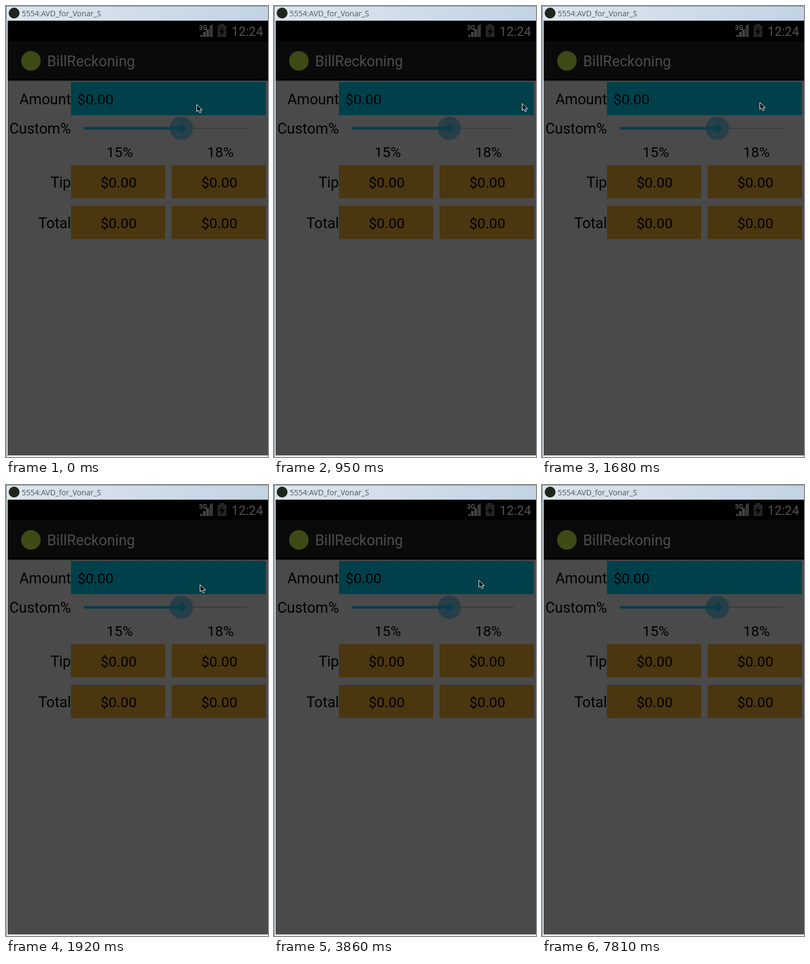
Animation of 484 by 830 pixels, one loop 8000 ms. Source, as an HTML page:

```html
<!DOCTYPE html>
<html lang="en">
<head>
<meta charset="utf-8">
<title>BillReckoning</title>
<style>
  html, body { margin: 0; width: 100%; height: 100%; overflow: hidden; background: #4a4a4a; }
  svg { display: block; }
  text { font-family: Roboto, sans-serif; font-size: 27px; }
  .value { font-size: 26.5px; }
  .mid { text-anchor: middle; }
  .end { text-anchor: end; }
</style>
</head>
<body>
<svg width="484" height="830" viewBox="0 0 484 830">
  <defs>
    <linearGradient id="caption">
      <stop offset="0" stop-color="#dde6ee"/>
      <stop offset=".4" stop-color="#d3dfea"/>
      <stop offset="1" stop-color="#c2d3e4"/>
    </linearGradient>
    <linearGradient id="shade" x2="0" y2="1">
      <stop offset="0" stop-color="#2c2c2c"/>
      <stop offset="1" stop-color="#4a4a4a"/>
    </linearGradient>
  </defs>

  <!-- window frame -->
  <rect width="484" height="830" fill="#e4ebf2"/>
  <rect width="484" height="27" fill="url(#caption)"/>
  <rect width="484" height="1" fill="#7b8894"/>
  <rect width="1" height="830" fill="#66717b"/>
  <circle cx="15" cy="13" r="10" fill="#20261a"/>
  <text x="29" y="19" fill="#50565c" style="font:14px 'Open Sans',sans-serif">5554:AVD_for_Vonar_S</text>

  <!-- screen -->
  <rect x="3" y="27" width="481" height="800" fill="#4a4a4a"/>
  <rect x="3" y="27" width="481" height="110" fill="#000"/>
  <rect x="3" y="65" width="481" height="69" fill="#0a0a0a"/>
  <rect x="3" y="137" width="481" height="2" fill="url(#shade)"/>

  <!-- status icons -->
  <path d="M359 53h4v4h-4zM364 48h5v9h-5zM370 43h5v14h-5z" fill="#454545"/>
  <path d="M376 37l6-4v24h-6z" fill="#393939"/>
  <text x="356.5" y="44" fill="#565656" style="font-size:12px;font-weight:700">3G</text>
  <path d="M395 33h8v3h4v21h-16v-21h4z" fill="#252525"/>
  <path d="M401 39l-7 9h4l-1 7 7-9h-4z" fill="#000"/>
  <text x="475" y="55" class="end" fill="#505050" style="font-size:23.5px">12:24</text>

  <circle cx="46" cy="101" r="18" fill="#3d4a15"/>
  <text x="76" y="111" fill="#4c4c4c">BillReckoning</text>

  <!-- form -->
  <rect x="120" y="140" width="360" height="61" fill="#00404b"/>
  <text x="132" y="181" class="value">$0.00</text>
  <path d="M324 225H444" stroke="#3b3b3b" stroke-width="2"/>
  <circle cx="324" cy="225" r="21.5" fill="#273f49"/>
  <g fill="#0b3d4c">
    <rect x="144" y="222.5" width="180" height="5"/>
    <circle cx="324" cy="225" r="7"/>
  </g>
  <g id="columns"></g>
  <g class="end">
    <text x="120" y="181">Amount</text>
    <text x="120" y="235">Custom%</text>
    <text x="120" y="334">Tip</text>
    <text x="120" y="409">Total</text>
  </g>

  <path id="cursor" d="M.5 .5V13.2L3.6 10.6 6 15.5 8.3 14.6 6.2 10H10.5Z" fill="#000" stroke="#fff"/>
</svg>
<script>
  const cell = (x, y) =>
    `<rect x="${x}" y="${y}" width="174" height="61" fill="#4a360f"/>
     <text x="${x + 88}" y="${y + 41}" class="mid value">$0.00</text>`;
  const column = (label, i) => {
    const x = 120 + 186 * i;
    return `<text x="${x + 90}" y="278" class="mid value">${label}</text>` + cell(x, 293) + cell(x, 368);
  };
  document.getElementById('columns').innerHTML = ['15%', '18%'].map(column).join('');

  // The pointer moves from one key point to the next in a number of equal jumps.
  const LOOP = 8000;
  const key = (time, x, y, jumps = 1) => ({
    offset: time / LOOP,
    transform: `translate(${x}px, ${y}px)`,
    easing: `steps(${jumps})`
  });
  const away = time => key(time, -40, -40);

  document.getElementById('cursor').animate([
    key(0, 352, 181), away(120),
    key(400, 476, 193),
    key(710, 470, 189, 2),
    key(950, 458, 179, 3),
    key(1380, 438, 173, 2),
    key(1680, 402, 177),
    key(1800, 356, 183),
    key(1920, 358, 183),
    key(2040, 382, 183, 2),
    key(2590, 382, 179),
    key(2740, 380, 177, 2),
    key(3860, 378, 175),
    key(7540, 378, 177),
    key(7660, 464, 301), away(7810), away(LOOP)
  ], { duration: LOOP, iterations: Infinity });
</script>
</body>
</html>
```
